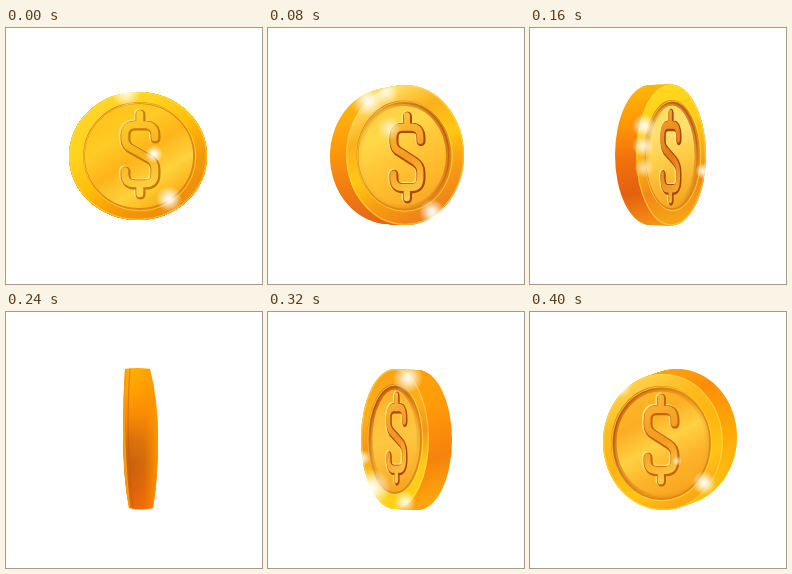
Animation of 256x256 px, one loop 0.48 s. Source, as an HTML page with a canvas:

```html
<!DOCTYPE html>
<html lang="en">
<head>
<meta charset="utf-8">
<title>Spinning coin</title>
<style>
  html, body { margin: 0; width: 100%; height: 100%; overflow: hidden; background: #fff; }
  canvas { display: block; width: 100vw; height: 100vh; }
</style>
</head>
<body>
<canvas id="stage" width="256" height="256"></canvas>
<script>
const ctx = document.getElementById('stage').getContext('2d');
const STEP = 80;

// Ellipses are [cx, cy, rx, ry]; sign is [cx, cy, width, height];
// glints are [x, y, radius, strength]; shade is the dark side of the recess.
const poses = [
  { back: [132, 128, 69, 64], rim: [132, 128, 69, 64], face: [133, 128, 55, 53],
    sign: [134, 126, 40, 88], shade: 0,
    side: ['#ffc400', '#f08a00'],
    rimTones: ['#ffd52a', '#ffd21c', '#ffbd08', '#f59a06', '#ee8c0c'],
    faceTones: ['#ffc41c', '#ffcb24', '#fdb41a', '#ffd23c', '#f9ae14'],
    signTones: ['#ffd02a', '#f7b01c', '#ffd84a'], edge: '#c47a0c',
    glints: [[120, 64, 15, .9], [148, 126, 9, 1], [163, 171, 13, 1]] },
  { back: [121, 128, 59, 68], rim: [137, 127, 59, 70], face: [136, 127.5, 46.5, 54],
    sign: [139, 129, 36, 90], shade: 1,
    side: ['#ffc010', '#ffa20a', '#f4800e', '#e4661a'],
    rimTones: ['#ffe26a', '#fcb01c', '#ffc814', '#f69c12', '#ee7e1c'],
    faceTones: ['#ffd040', '#ffd848', '#ffc636', '#fdba2c', '#f9a824'],
    signTones: ['#ffc238', '#f49a20', '#ffd04a'], edge: '#ac480c',
    glints: [[100, 72, 17, .95], [118, 64, 13, .8], [121, 100, 12, .6], [164, 184, 13, 1]] },
  { back: [120, 127, 35, 70], rim: [141, 127, 35, 70.5], face: [142, 127, 27, 54],
    sign: [140.5, 128.5, 21, 95], shade: 1,
    side: ['#ffb80a', '#ff9806', '#f0720c', '#e4600e', '#f59418'],
    rimTones: ['#ffd81c', '#ffcc18', '#fcae14', '#f08a18', '#f5a416'],
    faceTones: ['#ffdc5a', '#ffe070', '#ffd04a', '#fbb832', '#f5a822'],
    signTones: ['#f4a024', '#e47a14', '#f8b436'], edge: '#a4440a',
    glints: [[114, 98, 12, .95], [113, 118, 11, .85], [114, 140, 10, .6], [173, 143, 8, .9]] },
  { edgeOn: true },
  { back: [150, 128, 34, 70], rim: [127, 127, 34, 70], face: [126.5, 127, 26.5, 54],
    sign: [128.5, 126, 21, 92], shade: -1,
    side: ['#ffa408', '#ff9c0a', '#f6820c', '#ffb40e'],
    rimTones: ['#f9a414', '#fcb01c', '#f4961a', '#ffc818', '#ffd214'],
    faceTones: ['#f8ac26', '#ffc038', '#ffc640', '#fcba34', '#f8a622'],
    signTones: ['#ffb834', '#f29220', '#ffcc48'], edge: '#ae480c',
    glints: [[140, 66, 15, .95], [104, 176, 19, 1], [137, 190, 11, .85], [95, 146, 8, .8]] },
  { back: [147, 125, 60, 68], rim: [133, 130, 60, 68], face: [131, 131, 49, 56],
    sign: [131, 127.5, 36, 91], shade: -1,
    side: ['#ffb00c', '#ff8e06', '#ffa808', '#ffc010'],
    rimTones: ['#ffd04a', '#ffba1c', '#ffb410', '#ffc414', '#f8a414'],
    faceTones: ['#ffb628', '#fbae24', '#ffd042', '#fcb22a', '#f8a61e'],
    signTones: ['#fcb430', '#f39a20', '#ffcc44'], edge: '#c0680c',
    glints: [[90, 74, 12, .95], [174, 171, 12, 1], [147, 149, 5, .7]] }
];

function blend(x0, y0, x1, y1, tones) {
  const g = ctx.createLinearGradient(x0, y0, x1, y1);
  tones.forEach((c, i) => g.addColorStop(i / (tones.length - 1), c));
  return g;
}

function oval([cx, cy, rx, ry]) {
  ctx.beginPath();
  ctx.ellipse(cx, cy, rx, ry, 0, 0, Math.PI * 2);
}

function diagonal([cx, cy, rx, ry], tones) {
  return blend(cx - rx * .55, cy - ry * .85, cx + rx * .55, cy + ry * .85, tones);
}

function line(color, width) {
  ctx.strokeStyle = color;
  ctx.lineWidth = width;
  ctx.stroke();
}

// Light only lands on the coin, so nothing glows on the white ground.
function glint([x, y, r, strength]) {
  const g = ctx.createRadialGradient(x, y, 0, x, y, r);
  g.addColorStop(0, `rgba(255,255,255,${strength})`);
  g.addColorStop(.3, `rgba(255,255,250,${strength * .8})`);
  g.addColorStop(1, 'rgba(255,255,245,0)');
  ctx.fillStyle = g;
  ctx.fillRect(x - r, y - r, 2 * r, 2 * r);
}

const dollar = new Path2D(
  'M15-16V-19Q15-29 5-29H-5Q-15-29-15-19V-15Q-15-8-8-5L8 4' +
  'Q15 8 15 15V20Q15 30 5 30H-5Q-15 30-15 20V17M0-29V-40M0 30V40');

function drawSign([cx, cy, w, h], tones, edge) {
  const pass = (dx, dy, width, style) => {
    ctx.save();
    ctx.translate(cx + dx, cy + dy);
    ctx.scale(w / 40, h / 88);
    ctx.lineWidth = width;
    ctx.lineCap = ctx.lineJoin = 'round';
    ctx.strokeStyle = style;
    ctx.stroke(dollar);
    ctx.restore();
  };
  pass(-1, -.6, 10, '#ffe27a');
  pass(.5, .6, 10, edge);
  pass(-.2, -.2, 7, blend(-15, -40, 15, 40, tones));
}

// Recessed edge: a soft shadow on one side, a thin groove all round.
function drawRecess([cx, cy, rx, ry], shade) {
  const dark = blend(cx + shade * rx, cy - ry * .4, cx - shade * rx, cy + ry * .4,
    ['rgba(176,66,8,.6)', 'rgba(200,96,8,.25)', 'rgba(200,110,8,0)']);
  ctx.save();
  ctx.clip();
  if (shade) [9, 5].forEach(width => line(dark, width));
  ctx.restore();
  line(blend(cx - rx, cy - ry, cx + rx, cy + ry, ['#d98208', '#e08a10', '#e08414']), 1.8);
  oval([cx + .8, cy + .8, rx + 1, ry + 1]);
  line('rgba(255,226,90,.6)', 1);
}

function drawCoin(p) {
  const [bx, by, brx, bry] = p.back;
  const [fx, fy, frx, fry] = p.rim;
  const left = Math.min(bx - brx, fx - frx);
  const top = by - bry;
  ctx.fillStyle = blend(left + 20, top, left + (bx > fx ? 85 : 45), top + 2 * bry, p.side);
  const steps = 24;
  for (let i = 0; i <= steps; i++) {
    const k = i / steps;
    oval([bx + (fx - bx) * k, by + (fy - by) * k, brx + (frx - brx) * k, bry + (fry - bry) * k]);
    ctx.fill();
  }

  oval(p.rim);
  ctx.fillStyle = diagonal(p.rim, p.rimTones);
  ctx.fill();
  oval([fx, fy, frx - .7, fry - .7]);
  line('rgba(255,222,80,.55)', 1.2);

  oval(p.face);
  ctx.fillStyle = diagonal(p.face, p.faceTones);
  ctx.fill();
  drawRecess(p.face, p.shade);
  drawSign(p.sign, p.signTones, p.edge);
  p.glints.forEach(glint);
}

function drawEdge() {
  const body = new Path2D('M119 57Q131 55 144 57Q152 88 152 127Q152 168 147 196Q135 199 123 196Q117 165 117 125Q117 87 119 57Z');
  ctx.fillStyle = blend(126, 56, 142, 198, ['#ffb000', '#ffa000', '#f98a04', '#d8700c', '#c8620e', '#d9600c', '#f0680a']);
  ctx.fill(body);
  ctx.save();
  ctx.clip(body);
  ctx.fillStyle = blend(124, 0, 152, 0, ['rgba(255,145,0,0)', 'rgba(255,140,0,.2)', 'rgba(255,152,0,.95)']);
  ctx.fillRect(117, 56, 36, 143);
  ctx.beginPath();
  ctx.moveTo(124, 56);
  ctx.quadraticCurveTo(119, 125, 127, 198);
  line('rgba(190,88,8,.45)', 1.2);
  ctx.beginPath();
  ctx.moveTo(119, 56);
  ctx.quadraticCurveTo(115, 125, 123, 198);
  line('#f99a08', 3);
  ctx.restore();
}

function frame(time) {
  const p = poses[Math.floor(time / STEP) % poses.length];
  ctx.globalCompositeOperation = 'source-over';
  ctx.clearRect(0, 0, 256, 256);
  ctx.globalCompositeOperation = 'source-atop';
  ctx.globalCompositeOperation = 'source-over';
  p.edgeOn ? drawEdge() : drawCoin(p);
}

let start;
function tick(now) {
  start ??= now;
  frame(now - start);
  requestAnimationFrame(tick);
}
frame(0);
requestAnimationFrame(tick);
</script>
</body>
</html>
```
